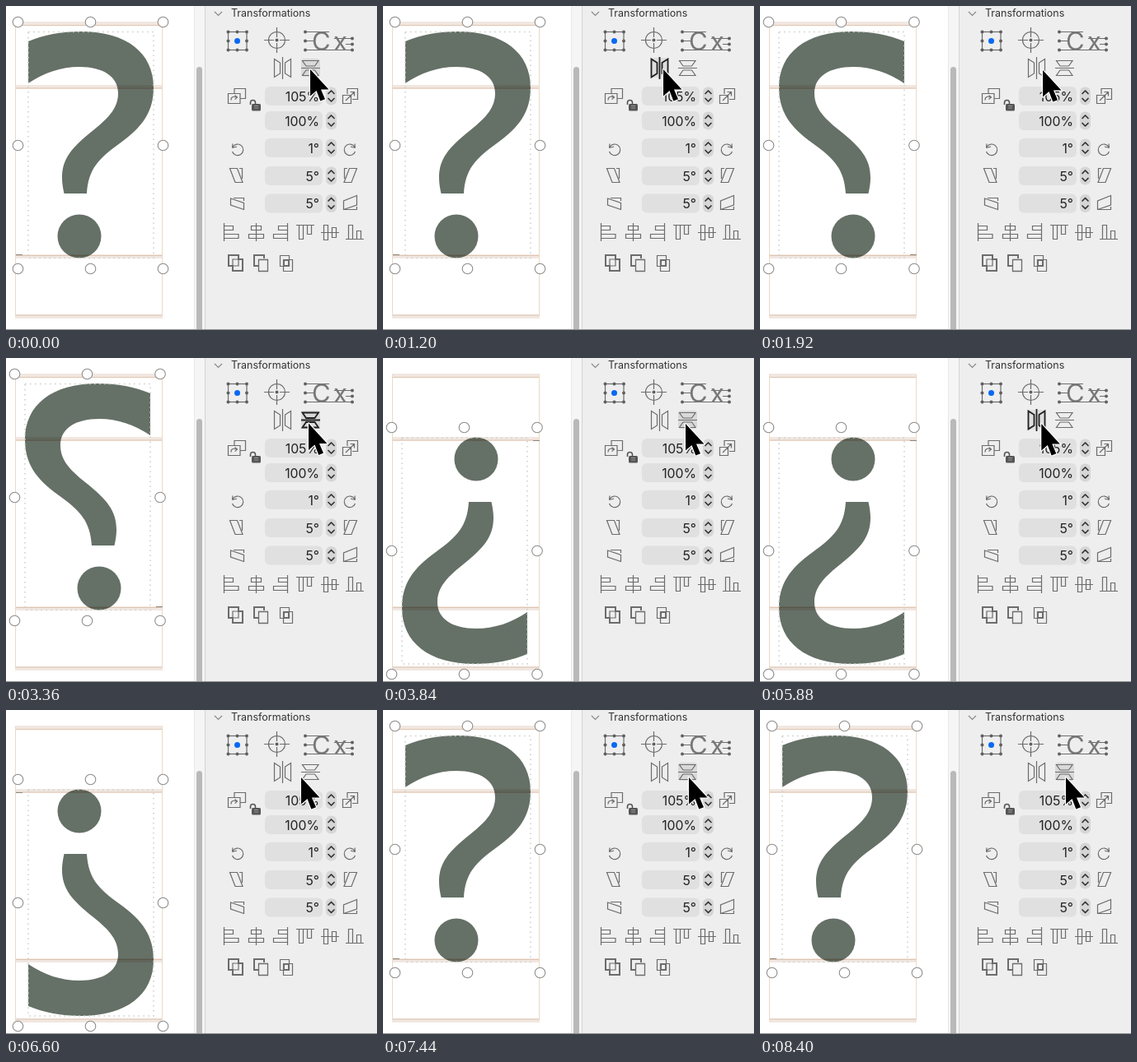
Write an HTML page that moves like this. It is 450 px wide and 394 px high and loops after 8520 ms.

```html
<!DOCTYPE html>
<html lang="en">
<head>
<meta charset="utf-8">
<title>Transformations panel</title>
<style>
html, body { margin: 0; width: 100%; height: 100%; overflow: hidden; background: #fff; }
svg { display: block; width: 450px; height: 394px; }
text { font-family: Inter, Roboto, sans-serif; }
.icon { fill: none; stroke: #6c6c6c; stroke-width: 1.2; }
.thick { stroke-width: 2; }
.dots circle { fill: #606060; stroke: none; }
.pressed { stroke: #202020; stroke-width: 1.8; }
.knob { fill: #fff; stroke: #8d8d8d; stroke-width: 1.1; }
</style>
</head>
<body>
<svg viewBox="0 0 450 394" xmlns="http://www.w3.org/2000/svg">
  <rect width="450" height="394" fill="#fff"/>

  <g id="glyph" fill="#657067">
    <path d="M27 43C46 35 67 31 91 31C146 31 179 57 179 99C179 128 166 147 138 167C112 186 100 198 98 228H70.500C69 221 68 215 68 209C68 185 80 172 106 151C126 135 136 123 136 106C136 86 118 74 89 74C67 74 46 81 27 94Z"/>
    <circle cx="89" cy="280" r="26.500"/>
  </g>
  <g id="guides" style="mix-blend-mode:multiply"></g>
  <rect id="bounds" width="152" height="275" fill="none" stroke="#cbd2cc" stroke-width="1.600" stroke-dasharray="1.600 4.400"/>
  <path id="tick" stroke="#8c8880" fill="none"/>
  <g id="knobs"></g>

  <rect x="228" width="14" height="394" fill="#f5f5f5"/>
  <path d="M228.500 0V394" stroke="#e8e8e8"/>
  <path d="M231 394V77.500a3.500 3.500 0 0 1 7 0V394Z" fill="#b9b9b9"/>
  <rect x="241" width="209" height="394" fill="#eee"/>
  <path d="M241.500 0V394" stroke="#d4d4d4"/>

  <path class="icon" d="M253 7l4.500 4.500L262 7" style="stroke:#8a8a8a"/>
  <text x="273" y="13" font-size="12.500" fill="#333">Transformations</text>

  <g class="icon">
    <rect x="269.500" y="31.500" width="22.500" height="22"/>
    <circle cx="328.500" cy="41.500" r="10"/>
    <path d="M313 41.500H325M332 41.500H344M328.500 26V38M328.500 45V57"/>
    <path d="M363 31.500H392M363 42.500H373M363 53.500H420M398 39.500H420M412 46.500H420"/>
  </g>
  <g id="dots" class="dots"></g>
  <circle cx="280.500" cy="42.500" r="3.500" fill="#0a68f5"/>
  <text x="371" y="54" font-size="31" fill="#777">C<tspan x="397">x</tspan></text>

  <rect id="tileH" x="324" y="63" width="23" height="24" rx="4" fill="#dedede"/>
  <rect id="tileV" x="358" y="64" width="23" height="22" rx="4" fill="#d9d9d9"/>
  <path id="flipH" class="icon" d="M335.500 62V89M325.500 64.500L332.500 69V82L325.500 86.500ZM345.500 64.500L338.500 69V82L345.500 86.500Z"/>
  <path id="flipV" class="icon" d="M358 75.500H381M359.500 66.500H379L374.500 73H364ZM359.500 84.500H379L374.500 78H364Z"/>

  <g id="fields"></g>

  <g class="icon">
    <path d="M277 107V100.500H290.500V112.500H284M269.500 106.500H284V118.500H269.500ZM273 114.500C273 110 276 109.500 280 111M277.500 108.500L280.500 111L277.500 113.500"/>
    <path d="M414 107V100.500H426.500V113.500H420M408.500 108.500H418.500V118.500H408.500ZM412 115L422 105M417.500 104.500H422.500V109.500"/>
    <path d="M275 167.500L274.500 172.500M274.500 172.500L280 171M275 171.500A6.800 6.800 0 1 1 274.500 177"/>
    <path d="M423 167.500L423.500 172.500M423.500 172.500L418 171M423 171.500A6.800 6.800 0 1 0 423.500 177"/>
    <path d="M271.500 197.500H280.500L287 214.500H278ZM283 197.500H286.500V210"/>
    <path d="M416.500 197.500H425.500L419 214.500H410ZM414 197.500H410.500V210"/>
    <path d="M272.500 234L288.500 239.500V247.500L272.500 242ZM276 233.500H288.500V237"/>
    <path d="M425.500 230.500L409.500 237V247.500L425.500 242ZM409.500 247.500H425.500V244"/>
  </g>
  <g>
    <rect x="298" y="119" width="11" height="8.500" rx="1.500" fill="#555"/>
    <path class="icon" d="M296.500 120V117.500a3 3 0 0 1 6 0V119.500" style="stroke:#555;stroke-width:1.600"/>
    <path d="M301 121.500H306M301 124H306" stroke="#999"/>
  </g>

  <g class="icon">
    <path d="M264.500 264V286M264.500 267.500H275.500V272.500H264.500M264.500 277.500H282V282.500H264.500"/>
    <path d="M303.500 264V286M297.500 267.500H309.500V272.500H297.500ZM294.500 277.500H312.500V282.500H294.500Z"/>
    <path d="M341.500 264V286M341.500 267.500H330.500V272.500H341.500M341.500 277.500H324.500V282.500H341.500"/>
    <path d="M352 266.500H374M355.500 266.500V283.500H360.500V266.500M365.500 266.500V277.500H370.500V266.500"/>
    <path d="M382 275.500H404M385.500 266.500H390.500V284.500H385.500ZM395.500 269.500H400.500V281.500H395.500Z"/>
    <path d="M412 283.500H434M415.500 283.500V266.500H420.500V283.500M425.500 283.500V273.500H430.500V283.500"/>
  </g>
  <g class="icon thick">
    <path d="M270 303H282V308H287V322H275V316H270Z"/>
    <path d="M275 308H282V316H275Z" stroke-width="1.200"/>
    <path d="M306 316H301V303H313V307"/>
    <path d="M306.500 308.500H317.500V322.500H306.500Z" stroke-width="1.300"/>
    <path d="M332.500 303.500H343.500V316.500H332.500ZM336.500 308.500H347.500V322.500H336.500Z" stroke-width="1.200"/>
    <path d="M337 309H343V316H337Z"/>
  </g>

  <path d="M0 393.500H450" stroke="#929292"/>
  <path id="cursor" d="M0 0V32.500L7.500 26L12.300 38.500L18 36.200L13 24.500H22.500Z" fill="#000" stroke="#fff" stroke-width="2.400" stroke-linejoin="round" paint-order="stroke"/>
</svg>
<script>
const $ = id => document.getElementById(id);
const LOOP = 8520, STEP = 120;

// time, tip x, tip y
const path = [
  [0, 369, 77], [240, 369, 77], [960, 340, 77], [1200, 340, 77],
  [1920, 343, 78], [2280, 344, 78], [3000, 367, 79], [3840, 367, 80],
  [4080, 366, 80], [4680, 342, 80], [5760, 341, 80], [6120, 342, 80],
  [6600, 358, 82], [6960, 371, 82], [LOOP, 371, 82]
];
// button, press time, release time
const clicks = [
  ["H", 1080, 1320], ["V", 3240, 3480], ["H", 5760, 6000], ["V", 7080, 7320]
];

$("guides").innerHTML =
  [[19, 23.5], [96, 100], [302, 303.5], [375, 376]].map(([y, line]) =>
    `<rect x="11" y="${y}" width="179" height="5" fill="#f1e7e1"/>
     <path d="M11 ${line}H190" stroke="#dfc5b1" stroke-width="1.2"/>`).join("") +
  `<path d="M11.500 20V377M189.500 20V377" stroke="#ecd9c6"/>`;

const dots = [];
for (const x of [269.5, 280.5, 292])
  for (const y of [31.5, 42.5, 53.5])
    if (x !== 280.5 || y !== 42.5) dots.push([x, y]);
for (const y of [31.5, 42.5, 53.5]) dots.push([363, y]);
for (const y of [39.5, 46.5, 53.5]) dots.push([420, y]);
dots.push([328.5, 41.5]);
$("dots").innerHTML = dots.map(([x, y]) => `<circle cx="${x}" cy="${y}" r="2"/>`).join("");

$("fields").innerHTML =
  [["105%", 109.5], ["100%", 139.5], ["1°", 172.5], ["5°", 206.5], ["5°", 240]].map(([label, y]) =>
    `<rect x="314" y="${y - 11.5}" width="70" height="23" rx="6" fill="#e0e0e0"/>
     <text x="380" y="${y + 6}" font-size="15.800" text-anchor="end" fill="#222">${label}</text>
     <rect x="388" y="${y - 11}" width="13" height="22" rx="6" fill="#d6d6d6"/>
     <path d="M391 ${y - 3}l3.500 -3.500l3.500 3.500M391 ${y + 3}l3.500 3.500l3.500 -3.500"
       fill="none" stroke="#333" stroke-width="1.700" stroke-linecap="round" stroke-linejoin="round"/>`).join("");

function tipAt(t) {
  const i = path.findIndex((p, n) => n && t <= p[0]);
  const [t0, x0, y0] = path[i - 1], [t1, x1, y1] = path[i];
  const k = (t - t0) / (t1 - t0), e = k * k * (3 - 2 * k);
  return [x0 + (x1 - x0) * e, y0 + (y1 - y0) * e];
}

let pose = "";
function setPose(h, v) {
  if (pose === `${h}${v}`) return;
  pose = `${h}${v}`;
  $("glyph").setAttribute("transform",
    `matrix(${h ? -1 : 1} 0 0 ${v ? -1 : 1} ${h ? 202 : 0} ${v ? 403 : 0})`);
  $("bounds").setAttribute("x", h ? 23 : 27);
  $("bounds").setAttribute("y", v ? 97 : 31.5);
  $("tick").setAttribute("d", `M${h ? 182 : 12} ${v ? 100.5 : 302.5}h8`);
  const xs = h ? [10.5, 98.5, 187] : [14.5, 102.5, 190.5];
  const ys = [19.5, 169.5, 319.5].map(y => y + (v ? 65 : 0));
  let out = "";
  xs.forEach((x, i) => ys.forEach((y, j) => {
    if (i !== 1 || j !== 1) out += `<circle class="knob" cx="${x}" cy="${y}" r="6.300"/>`;
  }));
  $("knobs").innerHTML = out;
}

function draw(t) {
  const [x, y] = tipAt(t);
  $("cursor").setAttribute("transform", `translate(${x.toFixed(1)} ${y.toFixed(1)})`);
  const flips = b => clicks.filter(c => c[0] === b && t >= c[2]).length % 2;
  const down = b => clicks.some(c => c[0] === b && t >= c[1] && t < c[2]);
  setPose(flips("H"), flips("V"));
  for (const b of ["H", "V"]) $("flip" + b).classList.toggle("pressed", down(b));
  $("tileH").style.opacity = down("H") ? 1 : 0;
  $("tileV").style.opacity = x > 361 ? 1 : 0;
}

function tick(now) {
  draw(Math.floor(now % LOOP / STEP) * STEP);
  requestAnimationFrame(tick);
}
draw(0);
requestAnimationFrame(tick);
</script>
</body>
</html>
```
